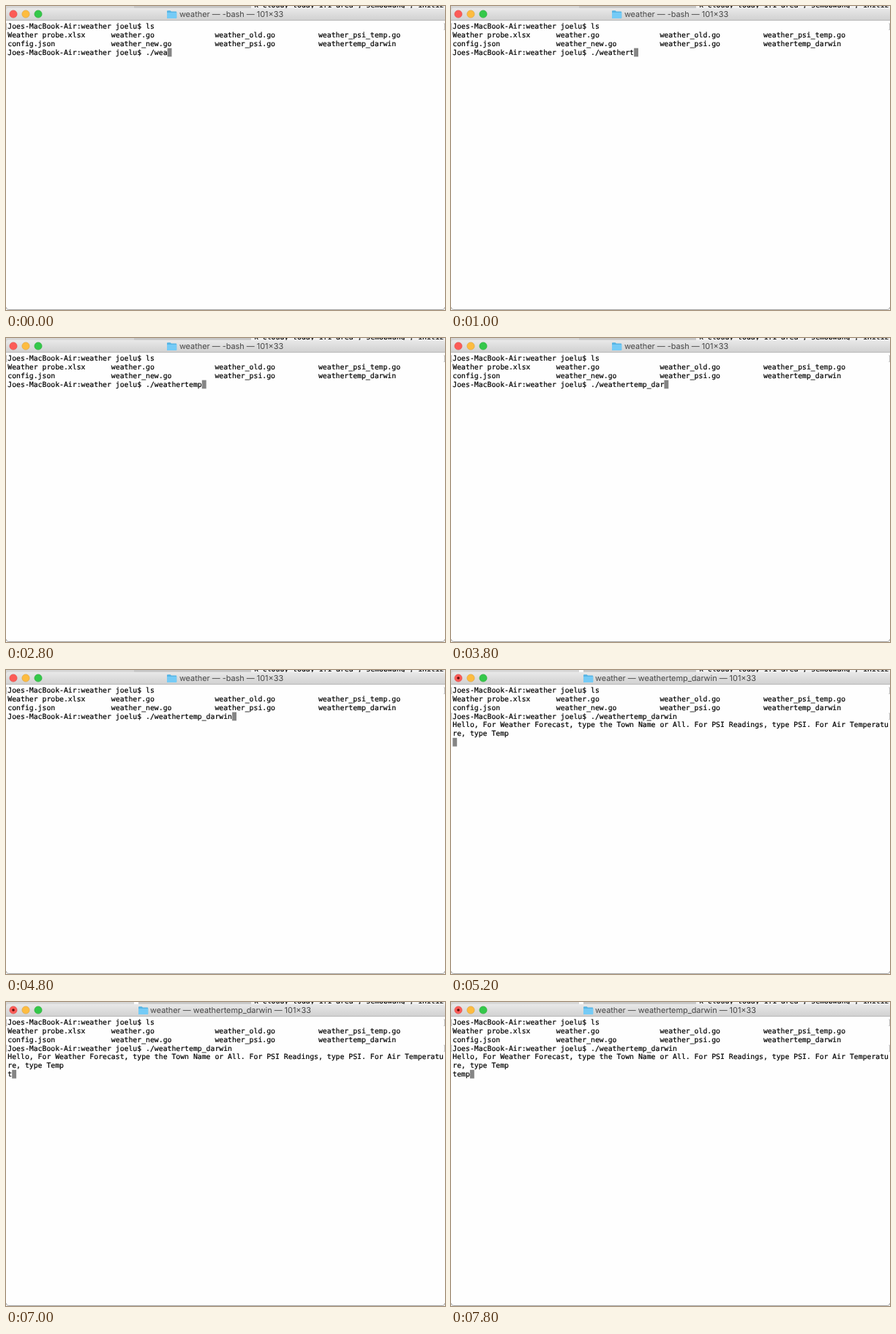
Animation, 600 px wide and 416 px high, one loop 8000 ms. Source, as an HTML page:

```html
<!DOCTYPE html>
<html lang="en">
<head>
<meta charset="utf-8">
<title>Terminal</title>
<style>
  html, body { margin: 0; width: 100%; height: 100%; overflow: hidden; background: #fff; }
  svg { display: block; width: 600px; height: 416px; }
  text { white-space: pre; text-rendering: geometricPrecision; }
  .mono { font: 9.8px "DejaVu Sans Mono", monospace; fill: #000; stroke: #000; stroke-width: .2px; }
  .title { font: 10.9px Inter, sans-serif; fill: #454545; text-anchor: middle; }
  .mark { fill: none; stroke: #b4b4b4; stroke-width: .9px; }
</style>
</head>
<body>
<svg viewBox="0 0 600 416">
  <defs>
    <linearGradient id="bar" x2="0" y2="1">
      <stop offset="0" stop-color="#e9e9e9"/>
      <stop offset="1" stop-color="#d0d0d0"/>
    </linearGradient>
  </defs>

  <!-- window behind -->
  <rect width="175" height="6" fill="#d6d6d6"/>
  <rect id="behind" y="0" height="6" fill="#c6c6c6"/>
  <rect x="335" width="265" height="6" fill="#f2f2f2"/>
  <text class="mono" x="339" y="1.8">k cloudy today 1.1 area , semobwang , initiz</text>

  <!-- terminal window -->
  <rect y="19" width="600" height="397" fill="#fefefe"/>
  <path d="M0 20V7Q0 2.7 4 2.7H596Q600 2.7 600 7V20Z" fill="url(#bar)"/>
  <path d="M0 19.6H600" stroke="#b2b2b2" stroke-width=".8"/>
  <path d="M0 412Q0 415.5 4 415.5H596Q600 415.5 600 412" fill="none" stroke="#a4a4a4"/>
  <g stroke-width=".6">
    <circle cx="10" cy="11" r="5.1" fill="#fc5b57" stroke="#df4744"/>
    <circle cx="27" cy="11" r="5.1" fill="#fdbc40" stroke="#de9f34"/>
    <circle cx="44" cy="11" r="5.1" fill="#34c84a" stroke="#27aa35"/>
  </g>
  <circle id="busy" cx="10" cy="11" r="1.8" fill="#5a0a08"/>
  <g id="folder">
    <path d="M0 7.2Q0 6.2 1 6.2H4.6L6 7.5H12.2Q13.2 7.5 13.2 8.5V16Q13.2 17 12.2 17H1Q0 17 0 16Z" fill="#56b4e4"/>
    <path d="M0 9.1H13.2V16Q13.2 17 12.2 17H1Q0 17 0 16Z" fill="#75cbf6"/>
  </g>
  <text id="title" class="title" y="15"></text>

  <path class="mark" d="M1.6 24H.4V32.5H1.6M598.4 24H599.6V32.5H598.4"/>
  <path id="mark" class="mark" d="M1.6 59.2H.4V67.7H1.6M598.4 59.2H599.6V67.7H598.4"/>
  <rect id="cursor" width="5.9" height="11.7" fill="#858585"/>
  <g id="screen"></g>
</svg>
<script>
const LOOP = 8000, RUN = 5200;
const CELL = 5.9, LINE = 11.75, LEFT = 2.3, TOP = 22.4;
const $ = id => document.getElementById(id);

const prompt = "Joes-MacBook-Air:weather joelu$ ";
const command = "./weathertemp_darwin";
const columns = (...names) => names.map(n => n.padEnd(24)).join("").trimEnd();
const listing = [
  prompt + "ls",
  columns("Weather probe.xlsx", "weather.go", "weather_old.go", "weather_psi_temp.go"),
  columns("config.json", "weather_new.go", "weather_psi.go", "weathertemp_darwin")
];
const greeting = [
  "Hello, For Weather Forecast, type the Town Name or All. For PSI Readings, type PSI. For Air Temperatu",
  "re, type Temp"
];

// Times at which one more character appears
const commandKeys = [200, 400, 600, 800, 1000, 1200, 1400, 1600,
                     3000, 3200, 3400, 3600, 4000, 4200, 4400];
const answerKeys = [7000, 7200, 7400, 7600];
const typed = (keys, t) => keys.filter(k => k <= t).length;

const rows = Array.from({ length: 7 }, (_, i) => {
  const row = document.createElementNS("http://www.w3.org/2000/svg", "text");
  row.setAttribute("class", "mono");
  row.setAttribute("x", LEFT);
  row.setAttribute("y", TOP + i * LINE + 9);
  $("screen").append(row);
  return row;
});

function setText(node, text) {
  if (node.textContent !== text) node.textContent = text;
}

function draw(t) {
  const running = t >= RUN;
  const lines = [...listing, prompt + command.slice(0, 5 + typed(commandKeys, t))];
  if (running) lines.push(...greeting, "temp".slice(0, typed(answerKeys, t)));
  rows.forEach((row, i) => setText(row, lines[i] || ""));

  const last = lines.length - 1;
  $("cursor").setAttribute("x", LEFT + lines[last].length * CELL);
  $("cursor").setAttribute("y", TOP + last * LINE);

  setText($("title"), `weather — ${running ? "weathertemp_darwin" : "-bash"} — 101×33`);
  $("title").setAttribute("x", running ? 307 : 308);
  $("folder").setAttribute("transform", `translate(${running ? 181 : 220} 0)`);
  $("behind").setAttribute("x", running ? 181 : 175);
  $("behind").setAttribute("width", running ? 154 : 160);
  for (const id of ["busy", "mark"]) $(id).style.display = running ? "" : "none";
}

const start = performance.now();
function frame() {
  draw((performance.now() - start) % LOOP);
  requestAnimationFrame(frame);
}
frame();
</script>
</body>
</html>
```
